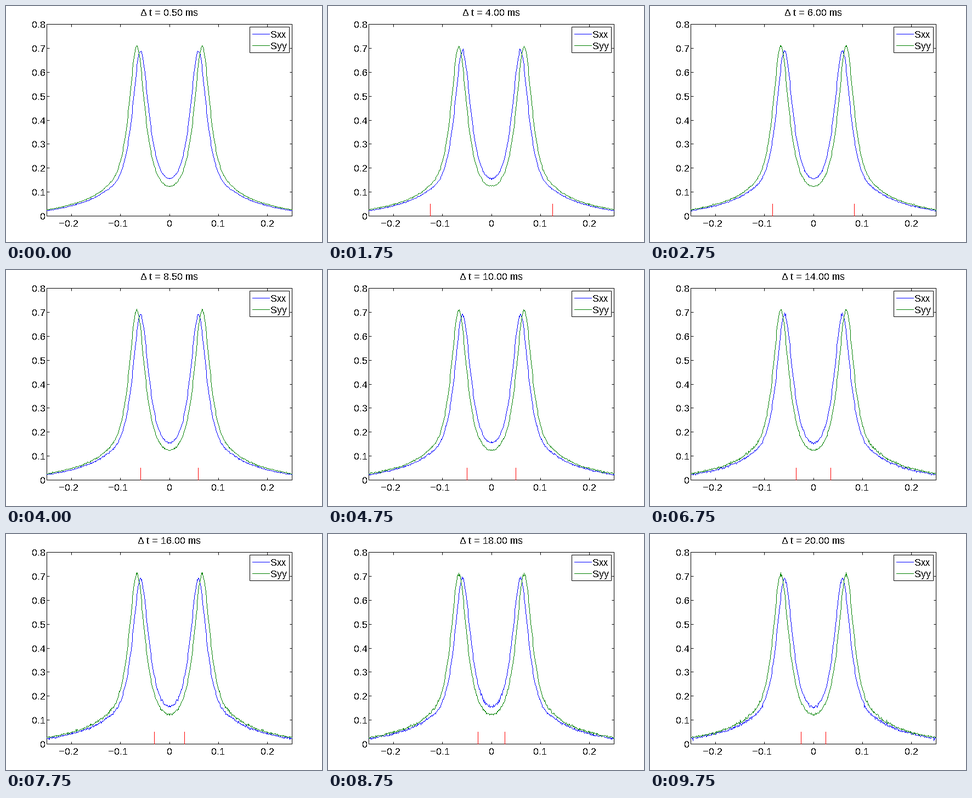
Write a matplotlib script that moves like this. It is 576 by 432 pixels and loops after 10 s.

```python
import numpy as np
import matplotlib.pyplot as plt
from matplotlib.animation import FuncAnimation
from matplotlib.patches import Rectangle

W, H, DPI = 576, 432, 72
LEFT, RIGHT, TOP, BOTTOM = 74, 521, 33, 384
FRAMES, INTERVAL = 40, 250
BLUE, GREEN, RED = (0, 0, 1), (0, 0.5, 0), (1, 0, 0)

plt.rcParams.update({
    "font.family": "Liberation Sans",
    "font.size": 18,
    "text.antialiased": False,
    "text.hinting": "native",
    "text.hinting_factor": 1,
    "axes.linewidth": 1,
    "lines.linewidth": 1,
    "lines.antialiased": False,
    "lines.solid_capstyle": "butt",
})

fig = plt.figure(figsize=(W / DPI, H / DPI), dpi=DPI, facecolor="white")
ax = fig.add_axes([LEFT / W, 1 - BOTTOM / H,
                   (RIGHT - LEFT) / W, (BOTTOM - TOP) / H])
ax.set(xlim=(-0.25, 0.25), ylim=(0, 0.8))
x_ticks = np.arange(-2, 3) / 10
y_ticks = np.arange(9) / 10
ax.set_xticks(x_ticks)
ax.set_yticks(y_ticks)
ax.tick_params(direction="in", length=4.5, width=1, top=True, right=True,
               labelbottom=False, labelleft=False)

# Overlay in pixel coordinates, y pointing down
page = fig.add_axes([0, 0, 1, 1])
page.set(xlim=(0, W), ylim=(H, 0))
page.axis("off")


def to_px(x):
    return LEFT + (x + 0.25) * (RIGHT - LEFT) / 0.5


def to_py(y):
    return BOTTOM - y * (BOTTOM - TOP) / 0.8


def label(x, baseline, text, ha="center"):
    return page.text(x, baseline, text, ha=ha, va="baseline", zorder=5)


def number(v):
    return f"{v:g}".replace("-", "\u2212")


for v in x_ticks:
    # The digits are centred on the tick, the minus sign hangs to the left
    label(to_px(v) + (-4.5 if v < 0 else 0.3), 404, number(v))
for v in y_ticks:
    label(72, to_py(v) + 7, number(v), "right")
title = label(297.5, 18, "")

page.add_patch(Rectangle((444, 38), 72, 47, facecolor="white",
                         edgecolor="black", linewidth=1, zorder=3))
for y, color, name in ((51, BLUE, "Sxx"), (72, GREEN, "Syy")):
    page.plot([449, 480], [y, y], color=color, zorder=4)
    label(482, y + 7, name, "left")

freq = np.linspace(0, 0.25, 251)


def mirror(half, sign=1):
    return np.concatenate((sign * half[:0:-1], half))


def spectrum(center, width2, height, bump, spread):
    """Mirrored resonance pair with a broad shoulder near 0.13."""
    pair = sum(width2 / ((freq - s * center) ** 2 + width2) for s in (1, -1))
    scale = np.where(freq < 0.13, 0.042, spread)
    return height * pair + bump * np.exp(-(abs(freq - 0.13) / scale) ** 1.5)


def trace(x, y):
    """Walk a polyline one pixel at a time, for a crisp one-pixel line."""
    px, py = np.round(to_px(x)), np.round(to_py(y))
    steps = np.maximum(abs(np.diff(px)), abs(np.diff(py)))
    at = np.concatenate(([0], np.cumsum(steps)))
    walk = np.arange(at[-1] + 1)
    # Pixel markers sit one row above their position
    return np.interp(walk, at, px), np.interp(walk, at, py) + 1


sxx = spectrum(0.059, 0.000462, 0.664, 0.041, 0.101)
syy = spectrum(0.0665, 0.000438, 0.686, 0.046, 0.110)

curves = [(page.plot([], [], ",", color=c, zorder=2)[0], s)
          for c, s in ((BLUE, sxx), (GREEN, syy))]
markers = [ax.plot([], [], color=RED, clip_on=False, zorder=4)[0]
           for _ in range(2)]


def draw(i):
    dt = 0.5 * (i + 1)
    rng = np.random.default_rng(100 + i)
    for line, base in curves:
        sigma = 0.0006 + 0.0001 * dt + 0.003 * base
        half = base + sigma * rng.standard_normal(freq.size)
        line.set_data(*trace(mirror(freq, -1), mirror(half)))
    edge = 0.5 / dt
    for line, x in zip(markers, (-edge, edge)):
        line.set_data([x, x], [0, 0.05])
        line.set_visible(edge <= 0.25)
    title.set_text(f"\u0394 t = {dt:.2f} ms")
    return [line for line, _ in curves] + markers + [title]


anim = FuncAnimation(fig, draw, frames=FRAMES, interval=INTERVAL,
                     repeat=True, repeat_delay=0, blit=False)
plt.show()
```
